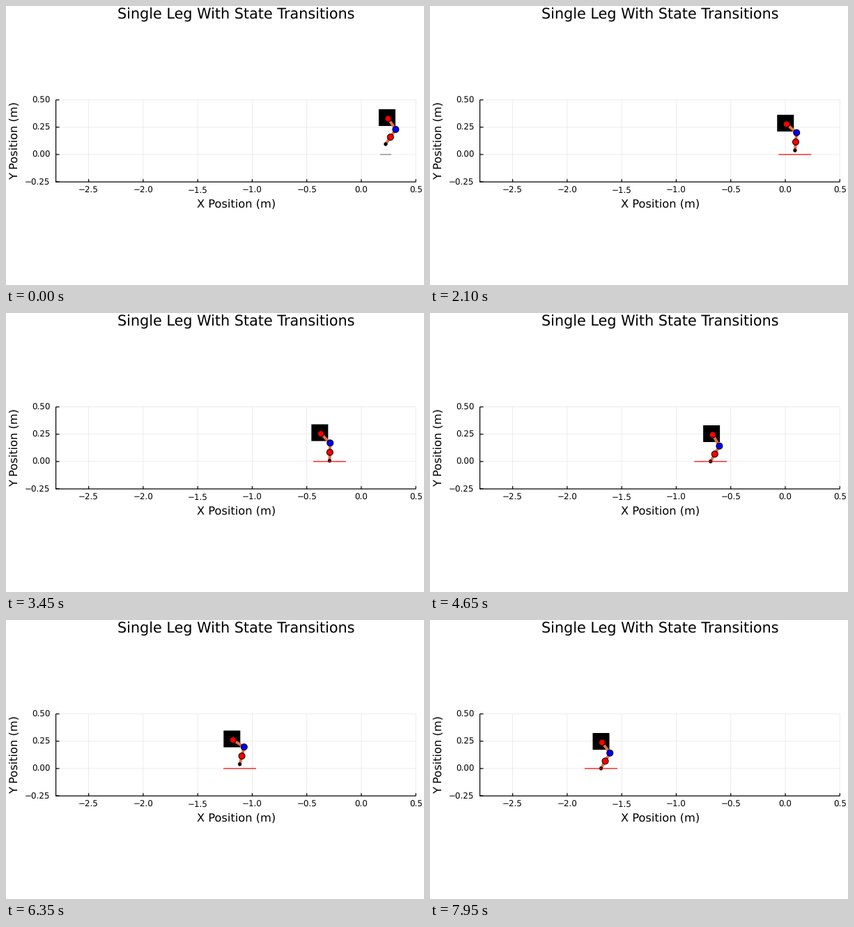
A matplotlib script that plays this animation: 600x400 px, repeating every 8000 ms.

```python
import numpy as np
import matplotlib.pyplot as plt
from matplotlib.animation import FuncAnimation
from matplotlib.patches import Circle, Rectangle

W, H, DPI = 600, 400, 100
PX = 72 / DPI                      # one pixel in points
FRAMES, STEP = 160, 50
UNIT, X0, Y0 = 156.55, 510, 212.9  # pixels per metre and the origin
LEFT, RIGHT, TOP, BOTTOM = 71.6, 588.3, 134.6, 252.2

THIGH, SHIN, ANKLE = 18.9, 25.5, 0.525
BODY = 24
HIP_START, HIP_Y = (548.5, 161.5), 173.6
FOOT_START, FOOT_Y = (545, 198), 212.8
SWING = 6                          # how far the foot is lifted in a hop

# touchdown and take-off in turn: time in ms, foot x, hip x
EVENTS = [
    (800, 545, 549), (1780, 565, 545),
    (2560, 453, 464), (3410, 465, 454),
    (4200, 394.8, 412), (4750, 403, 403.2),
    (5570, 350.7, 356.5), (6030, 357.3, 340),
    (6650, 315.8, 312.5), (7040, 317.6, 305.5),
    (7630, 237.6, 252.5), (8250, 247.9, 241.7),
]

plt.rcParams.update({"font.family": "DejaVu Sans",
                     "text.hinting": "no_hinting", "path.snap": False})


def lerp(a, b, s):
    return a + (b - a) * s


def fall(s):
    """Drop from rest, up to the first touchdown."""
    hip = lerp(HIP_START[0], EVENTS[0][2], s), lerp(HIP_START[1], HIP_Y, s * s)
    foot = FOOT_START[0], lerp(FOOT_START[1], FOOT_Y, s * s)
    return hip, foot


def stance(s, start, end):
    """The foot slides back while the hip dips and slows down midway."""
    dip = 1.8 * ((end[0] - start[0]) / 600) ** 2
    slow = s + s * (1 - s) * (1 - 2 * s)
    hip = lerp(start[2], end[2], slow), HIP_Y + dip * 4 * s * (1 - s)
    foot = lerp(start[1], end[1], 1 - (1 - s) ** 2), FOOT_Y
    return hip, foot


def flight(s, start, end):
    """The hip flies a parabola while the foot swings to the next spot."""
    rise = (start[1] - end[1]) / 26
    hip = lerp(start[2], end[2], s), HIP_Y - rise * 4 * s * (1 - s)
    foot = (lerp(start[1], end[1], s * s * (3 - 2 * s)),
            FOOT_Y - SWING * np.sin(np.pi * s))
    return hip, foot


def pose(t):
    if t < EVENTS[0][0]:
        return fall(t / EVENTS[0][0])
    i = max(k for k, event in enumerate(EVENTS) if event[0] <= t)
    start, end = EVENTS[i], EVENTS[i + 1]
    s = (t - start[0]) / (end[0] - start[0])
    return (flight if i % 2 else stance)(s, start, end)


def bend(hip, foot):
    """Knee position, always on the right of the leg."""
    d = foot - hip
    dist = np.hypot(*d)
    along = (THIGH ** 2 - SHIN ** 2 + dist ** 2) / (2 * dist)
    out = np.sqrt(max(THIGH ** 2 - along ** 2, 0))
    return hip + along * d / dist + out * np.array([d[1], -d[0]]) / dist


fig = plt.figure(figsize=(W / DPI, H / DPI), dpi=DPI, facecolor="white")
ax = fig.add_axes([0, 0, 1, 1])
ax.set_xlim(0, W)
ax.set_ylim(H, 0)
ax.axis("off")


def line(xs, ys, color="black", width=1.2, z=2):
    return ax.plot(xs, ys, color=color, lw=width * PX, zorder=z,
                   solid_capstyle="butt", solid_joinstyle="round")[0]


def grid(xs, ys):
    line(xs, ys, "#e5e5e5", 0.7, 1)


def label(x, y, text, px, **kw):
    style = {"ha": "center", "va": "baseline", "rotation_mode": "anchor"}
    ax.text(x, y, text, fontsize=px * PX, color="black", **{**style, **kw})


def number(value, digits):
    return f"{value:.{digits}f}".replace("-", "\u2212")


for v in np.arange(-2.5, 0.6, 0.5):
    x = X0 + UNIT * v
    grid([x, x], [TOP, BOTTOM])
    line([x, x], [BOTTOM, BOTTOM - 4])
    label(x, 268.2, number(v, 1), 11.85)
for v in np.arange(-0.25, 0.6, 0.25):
    y = Y0 - UNIT * v
    grid([LEFT, RIGHT], [y, y])
    line([LEFT, LEFT + 5], [y, y])
    label(63.5, y + 4.3, number(v, 2), 11.85, ha="right")
line([LEFT, LEFT], [TOP, BOTTOM])
line([LEFT - 0.6, RIGHT], [BOTTOM, BOTTOM])

label(330, 18.3, "Single Leg With State Transitions", 20.75)
label(330.3, 288.6, "X Position (m)", 16.3)
label(16.6, 193, "Y Position (m)", 16.3, rotation=90)


def joint(color, radius, edge=1.0):
    dot = Circle((0, 0), radius, fc=color, ec="black", lw=edge * PX, zorder=6)
    return ax.add_patch(dot)


body = ax.add_patch(Rectangle((0, 0), BODY, BODY, fc="black", lw=0, zorder=4))
leg = line([], [], "#e26f46", 4, 5)
joints = [joint("red", 4.5), joint("blue", 4.5),
          joint("red", 4.5), joint("black", 2.4, 0.5)]
ground = line([], [], "gray", 1.2, 7)


def draw(n):
    t = n * STEP
    hip, foot = map(np.array, pose(t))
    knee = bend(hip, foot)
    ankle = lerp(knee, foot, ANKLE)
    body.set_xy(hip - 1.5 - BODY / 2)
    leg.set_data(*zip(hip, knee, foot))
    for dot, pos in zip(joints, (hip, knee, ankle, foot)):
        dot.center = tuple(pos)

    landed = t >= EVENTS[0][0]
    half = 23.5 if landed else 8
    ground.set_data([foot[0] - half, min(foot[0] + half, RIGHT)], [Y0, Y0])
    ground.set_color("red" if landed else "gray")
    return body, leg, *joints, ground


anim = FuncAnimation(fig, draw, frames=FRAMES, interval=STEP,
                     repeat=True, repeat_delay=0, blit=False)
plt.show()
```
